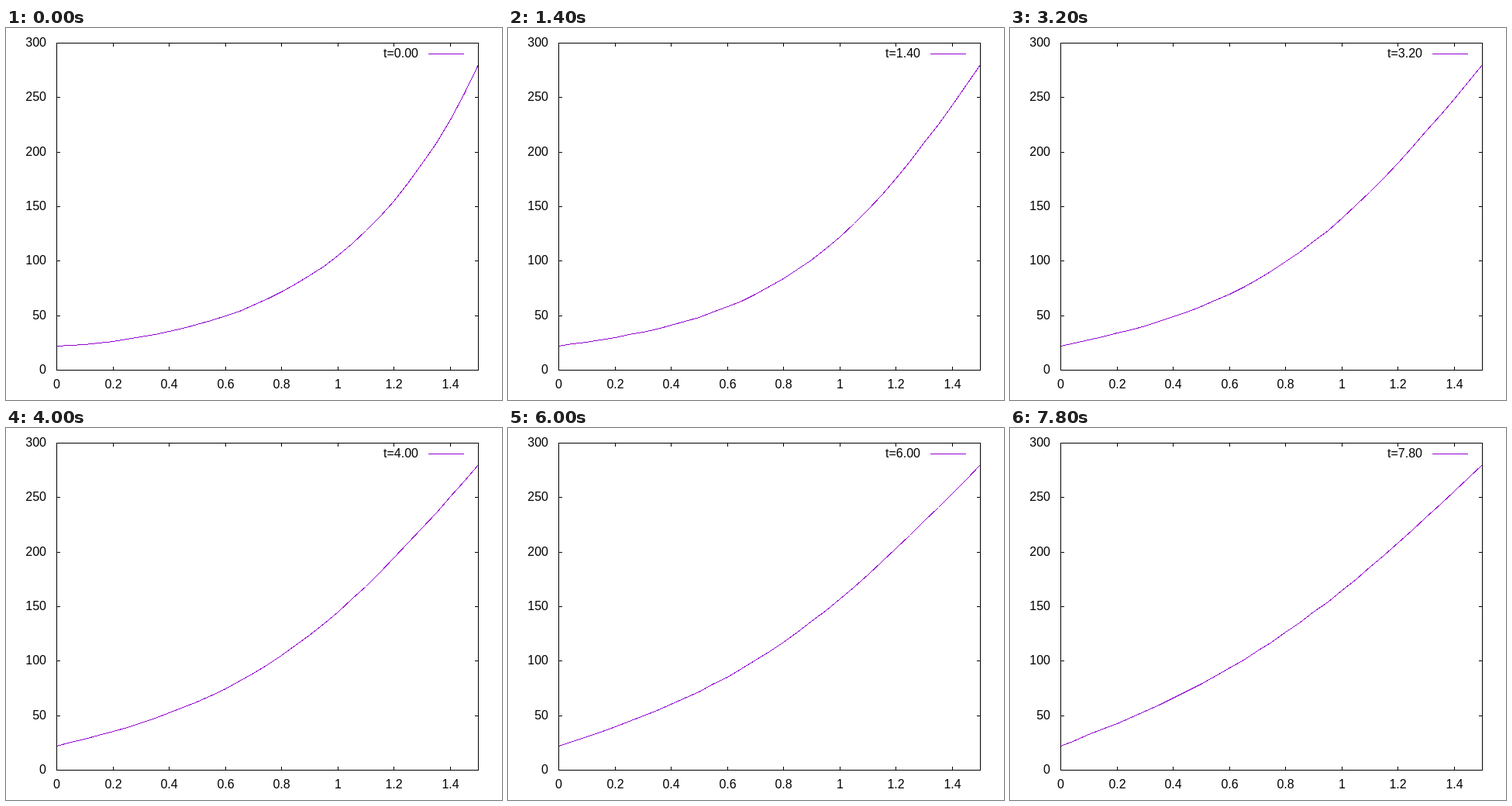
An HTML page for the animation above (8000 ms loop, 640x480 px).

```html
<!DOCTYPE html>
<html lang="en">
<head>
<meta charset="utf-8">
<title>Heat diffusion</title>
<style>
  html, body { margin: 0; width: 100%; height: 100%; overflow: hidden; background: #fff; }
  svg { display: block; width: 640px; height: 480px; }
  text { font: 16px "Liberation Sans", Arial, sans-serif; fill: #000; }
  path { fill: none; stroke: #000; stroke-width: 1; shape-rendering: crispEdges; }
  .curve { stroke: #9400d3; }
</style>
</head>
<body>
<svg viewBox="0 0 640 480">
  <g id="labels"></g>
  <text id="legend" x="532" y="38" text-anchor="end"></text>
  <path class="curve" d="M545 33.5H591"/>
  <path class="curve" id="curve"/>
  <path id="axes"/>
</svg>
<script>
const LOOP = 8000, STEP = 200;
const BOX = { left: 65, right: 609, top: 19, bottom: 441 };
const LENGTH = 1.5, Y_MAX = 300, TICK = 5, SEGMENTS = 30;

// Rod with fixed end temperatures; the initial profile follows u'' = K²u.
const COLD = 22, HOT = 280, K = 1.975, DIFFUSIVITY = 0.02905, MODES = 30;

const byId = id => document.getElementById(id);
const toX = x => Math.round(BOX.left + x / LENGTH * (BOX.right - BOX.left));
const toY = y => Math.round(BOX.bottom - y / Y_MAX * (BOX.bottom - BOX.top));

function temperature(x, t) {
  if (t === 0) {
    return (COLD * Math.sinh(K * (LENGTH - x)) + HOT * Math.sinh(K * x)) / Math.sinh(K * LENGTH);
  }
  let u = COLD + (HOT - COLD) * x / LENGTH;
  const kl2 = (K * LENGTH) ** 2;
  for (let n = 1; n <= MODES; n++) {
    const w = n * Math.PI;
    const ends = COLD - (n % 2 ? -HOT : HOT);
    const amplitude = 2 / w * kl2 / (kl2 + w * w) * ends;
    u -= amplitude * Math.sin(w * x / LENGTH) * Math.exp(-DIFFUSIVITY * (w / LENGTH) ** 2 * t);
  }
  return u;
}

function drawAxes() {
  const { left, right, top, bottom } = BOX;
  let d = `M${left + .5} ${top + .5}H${right + .5}V${bottom + .5}H${left + .5}Z`;
  let labels = "";
  const label = (x, y, anchor, value) =>
    labels += `<text x="${x}" y="${y}" text-anchor="${anchor}">${value}</text>`;

  for (let i = 0; i <= 7; i++) {
    const value = i / 5, x = toX(value);
    d += `M${x + .5} ${top}v${TICK}M${x + .5} ${bottom + 1}v${-TICK}`;
    label(x + .5, 465, "middle", value);
  }
  for (let value = 0; value <= Y_MAX; value += 50) {
    const y = toY(value);
    d += `M${left} ${y + .5}h${TICK}M${right + 1} ${y + .5}h${-TICK}`;
    label(52, y + 5, "end", value);
  }
  byId("axes").setAttribute("d", d);
  byId("labels").innerHTML = labels;
}

function drawCurve(t) {
  const points = Array.from({ length: SEGMENTS + 1 }, (_, i) => {
    const x = i / SEGMENTS * LENGTH;
    return `${toX(x) + .5} ${toY(temperature(x, t)) + .5}`;
  });
  byId("curve").setAttribute("d", "M" + points.join("L"));
  byId("legend").textContent = "t=" + t.toFixed(2);
}

let shown = -1;
const start = performance.now();
function tick(now) {
  const step = Math.floor(Math.max(0, now - start) % LOOP / STEP);
  if (step !== shown) drawCurve((shown = step) * STEP / 1000);
  requestAnimationFrame(tick);
}

drawAxes();
tick(start);
</script>
</body>
</html>
```
